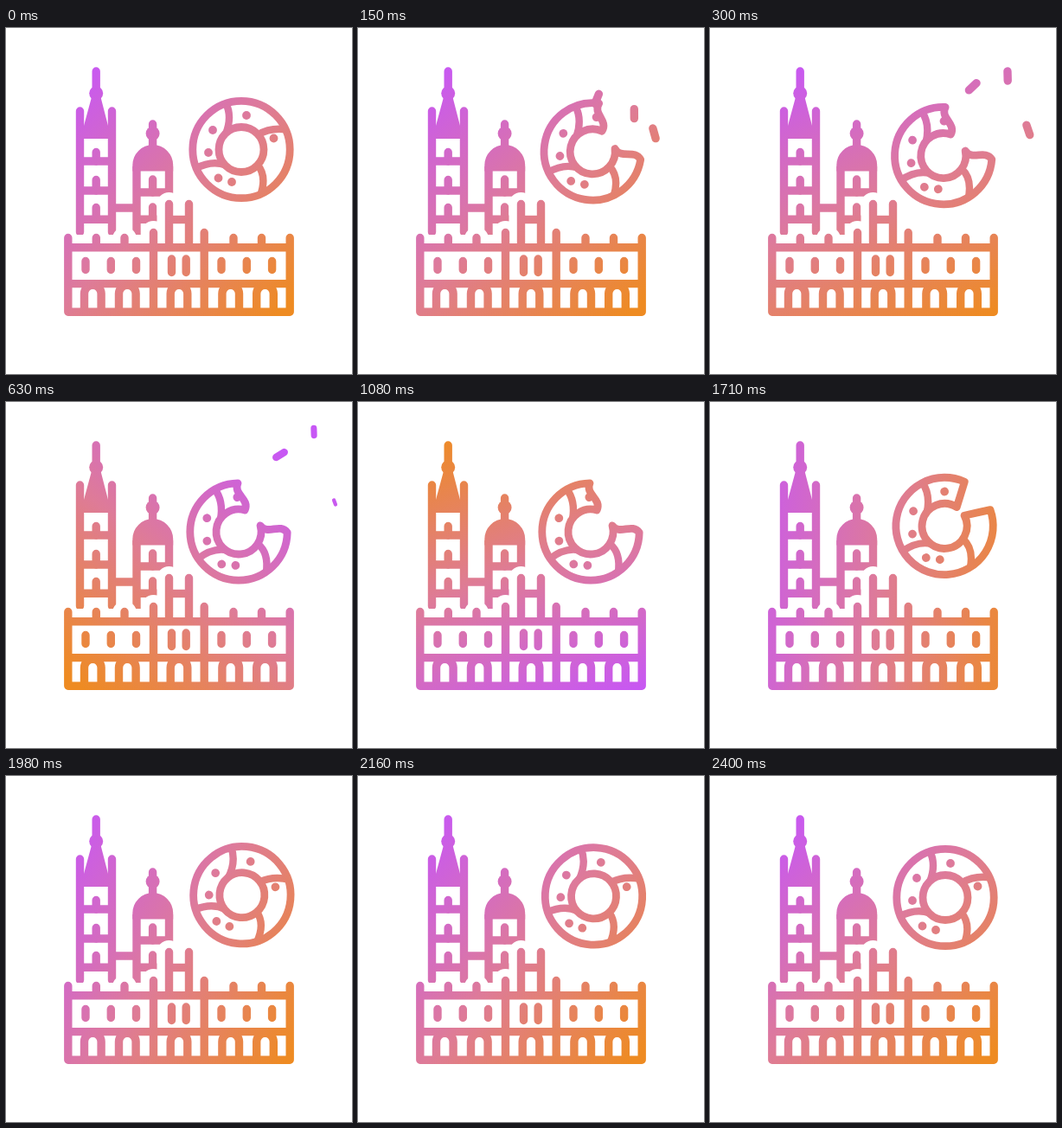
An HTML page that plays this animation: 400 by 400 pixels, repeating every 4430 ms.

```html
<!DOCTYPE html>
<html lang="en">
<head>
<meta charset="utf-8">
<title>Town hall and ring cake</title>
<style>
html, body { margin: 0; width: 100%; height: 100%; overflow: hidden; background: #fff; }
svg { display: block; width: 100vw; height: 100vh; }
.line { fill: none; stroke: url(#tint); stroke-width: 9.4; stroke-linecap: round; stroke-linejoin: round; }
.flat { stroke-linecap: butt; }
.solid { fill: url(#tint); }
.halo { fill: none; stroke: #fff; stroke-width: 28; stroke-linecap: round; }
</style>
</head>
<body>
<svg viewBox="0 0 400 400">
  <defs>
    <linearGradient id="tint" gradientUnits="userSpaceOnUse" x1="20" y1="190" x2="380" y2="190">
      <stop offset="0" stop-color="#c757f5"/>
      <stop offset=".5" stop-color="#de7b98"/>
      <stop offset="1" stop-color="#ee8b22"/>
    </linearGradient>
    <clipPath id="bodyClip"><path id="clipShape" clip-rule="evenodd"/></clipPath>
  </defs>

  <!-- towers -->
  <path class="line" d="M85.5 96V236M122.5 96V236M104.2 50V80"/>
  <path class="line flat" d="M85 154H123M85 188H123M85 221.3H123M123 208H151M151 160V240M188.5 160V225M151 190H188M151 221.3H188"/>
  <path class="line" d="M104.2 143.5V154M104.2 175.5V188M104.2 207.5V221M169.6 175V190M169.6 207V221M169.6 111V137"/>
  <path class="solid" d="M99.5 78H109L118 113V117H127V128H81V117H90V113ZM146.3 165.5V158.5A23.4 23.4 0 0 1 193.2 158.5V165.5Z"/>
  <circle class="solid" cx="104.2" cy="75.5" r="8"/>
  <circle class="solid" cx="169.6" cy="122" r="8"/>

  <!-- clearance in front of the towers -->
  <path class="halo" d="M137 244V260M170.5 237V260M188.5 204V260M211.5 204V260"/>
  <rect x="60" y="239" width="280" height="94" fill="#fff"/>

  <!-- hall -->
  <path class="line" d="M71.8 242.5V328.2H328.2V242.5M72 253.8H328M72 295.6H328M170.5 236.5V328M229.2 236.5V328M188.5 203.5V253M211.5 203.5V253"/>
  <path class="line flat" d="M188 221.5H212"/>
  <g id="details"></g>

  <g id="cakeMove">
    <g clip-path="url(#bodyClip)">
      <path class="line" stroke-linecap="butt" style="stroke-width:8.4" d="M-18 -54Q-10 -38 -18 -18M53 -23Q34 -26 19 -17M19 18Q30 31 22 53M-53 22Q-34 12 -18 18"/>
      <g id="spots"></g>
    </g>
    <path id="body" class="line" style="stroke-width:8.8"/>
  </g>
  <g id="crumbs"></g>
</svg>
<script>
const LOOP = 4430, MOVE = 2400, STEP = 30;
const $ = id => document.getElementById(id);
const tint = $('tint');

function add(parent, tag, attrs) {
  const el = document.createElementNS('http://www.w3.org/2000/svg', tag);
  for (const k in attrs) el.setAttribute(k, attrs[k]);
  parent.appendChild(el);
  return el;
}

// hall details: roof posts, windows, arches
const bar = (x, y1, y2) => `M${x} ${y1}V${y2}`;
const arch = x => `M${x - 9.8} 324V307A9.8 9.8 0 0 1 ${x + 9.8} 307V324`;
add($('details'), 'path', {
  class: 'line',
  d: [104.3, 137, 263, 295.5].map(x => bar(x, 242.5, 253)).join('') +
     [92, 121.3, 150.5, 249, 278.3, 307.6].map(x => bar(x, 269.5, 279.5)).join('') +
     [191.5, 208.2].map(x => bar(x, 267, 282.5)).join('') +
     [100.3, 140.3, 200, 259.7, 299.5].map(arch).join('')
});

for (const [cx, cy] of [[6, -39.5], [37.5, -13], [-33, -22.5], [-38, 3.5], [-26.5, 33], [-11, 37.5]])
  add($('spots'), 'circle', { class: 'solid', cx, cy, r: 4.9 });

// start point, end point, start and end angle, length, shrink start and end
const crumbs = [
  { a: [268, 86], b: [317, 61], r: [105, 148], len: 12, out: [600, 960] },
  { a: [312, 112], b: [356, 34.5], r: [90, 88], len: 11, out: [540, 900] },
  { a: [335, 123], b: [380, 116], r: [75, 70], len: 12, out: [450, 780] }
];
for (const c of crumbs) c.el = add($('crumbs'), 'path', { class: 'line', d: `M${-c.len / 2} 0H${c.len / 2}` });

const clamp = u => Math.min(1, Math.max(0, u));
const mix = (a, b, u) => a + (b - a) * u;
const sine = u => (1 - Math.cos(Math.PI * u)) / 2;
const span = (t, a, b) => clamp((t - a) / (b - a));

function keyed(t, keys) {
  let i = 1;
  while (i < keys.length - 1 && t > keys[i][0]) i++;
  const [t0, v0] = keys[i - 1], [t1, v1] = keys[i];
  return mix(v0, v1, sine(span(t, t0, t1)));
}

// cubic timing curve with control points (a, 0) and (b, 1)
function curve(x, a, b) {
  let lo = 0, hi = 1;
  for (let i = 0; i < 24; i++) {
    const s = (lo + hi) / 2, q = 1 - s;
    if (3 * s * q * q * a + 3 * s * s * q * b + s * s * s < x) lo = s; else hi = s;
  }
  return lo * lo * (3 - 2 * lo);
}

const polar = (r, deg) => [r * Math.cos(deg * Math.PI / 180), r * Math.sin(deg * Math.PI / 180)];
const pt = p => p.map(v => v.toFixed(2)).join(' ');
const ring = r => `M${r} 0A${r} ${r} 0 1 1 ${-r} 0A${r} ${r} 0 1 1 ${r} 0Z`;

function edge(p, q, wave) {
  const dx = q[0] - p[0], dy = q[1] - p[1], n = Math.hypot(dx, dy);
  const at = (u, w) => [p[0] + dx * u - dy / n * w, p[1] + dy * u + dx / n * w];
  return `C${pt(at(.35, wave))} ${pt(at(.65, -wave))} ${pt(q)}`;
}

// ring cake with a bite; gap runs from 0 (whole) to 1
function cakePath(gap) {
  const R = 56.2, r = 26, mid = -34;
  if (gap < .002) return ring(R) + ring(r);
  const wave = 9 * clamp(2 * gap - 1);
  const o1 = polar(R, mid - 46 * gap), o2 = polar(R, mid + 46 * gap);
  const i1 = polar(r, mid - 29 * gap), i2 = polar(r, mid + 29 * gap);
  return `M${pt(o2)}A${R} ${R} 0 1 1 ${pt(o1)}${edge(o1, i1, wave)}` +
         `A${r} ${r} 0 1 0 ${pt(i2)}${edge(i2, o2, wave)}Z`;
}

function draw(t) {
  const turn = 45 + 360 * curve(clamp(t / MOVE), .33, .43);
  tint.setAttribute('gradientTransform', `rotate(${turn} 200 190)`);

  const shift = keyed(t, [[0, 0], [450, 1], [1450, 1], [1950, -.3], [2400, 0]]);
  const tilt = keyed(t, [[0, 0], [480, -11], [1620, -11], [1980, 5.5], [2400, 0]]);
  $('cakeMove').setAttribute('transform', `translate(${272 - 3 * shift} ${140.5 + 9.5 * shift}) rotate(${tilt})`);

  // keep the tint fixed to the stage while the cake moves
  const gap = t < 120 ? 0 : 1 - sine(span(t, 1500, 1920));
  const d = cakePath(gap);
  $('body').setAttribute('d', d);
  $('clipShape').setAttribute('d', d);
  localTint('cakeTint', $('cakeMove'), turn, 272 - 3 * shift, 140.5 + 9.5 * shift, tilt);

  const fly = 1 - Math.pow(1 - span(t, 120, 630), 3);
  crumbs.forEach((c, i) => {
    const x = mix(c.a[0], c.b[0], fly), y = mix(c.a[1], c.b[1], fly);
    const rot = mix(c.r[0], c.r[1], fly), size = 1 - span(t, ...c.out);
    const shown = t >= 120 && size > 0;
    c.el.style.display = shown ? '' : 'none';
    if (!shown) return;
    c.el.setAttribute('transform', `translate(${x} ${y}) rotate(${rot}) scale(${size})`);
    localTint('crumbTint' + i, c.el, turn, x, y, rot, size);
  });
}

// gradient that undoes the placement of a moved part
const tints = {};
function localTint(id, el, turn, x, y, rot, size = 1) {
  if (!tints[id]) {
    tints[id] = tint.cloneNode(true);
    tints[id].id = id;
    tint.parentNode.appendChild(tints[id]);
    for (const part of [el, ...el.querySelectorAll('.line, .solid')]) {
      if (part.matches('.line')) part.style.stroke = `url(#${id})`;
      if (part.matches('.solid')) part.style.fill = `url(#${id})`;
    }
  }
  tints[id].setAttribute('gradientTransform',
    `scale(${1 / size}) rotate(${-rot}) translate(${-x} ${-y}) rotate(${turn} 200 190)`);
}

const start = performance.now();
function frame() {
  const t = (performance.now() - start) % LOOP;
  draw(Math.min(MOVE, Math.floor(t / STEP) * STEP));
  requestAnimationFrame(frame);
}
frame();
</script>
</body>
</html>
```
